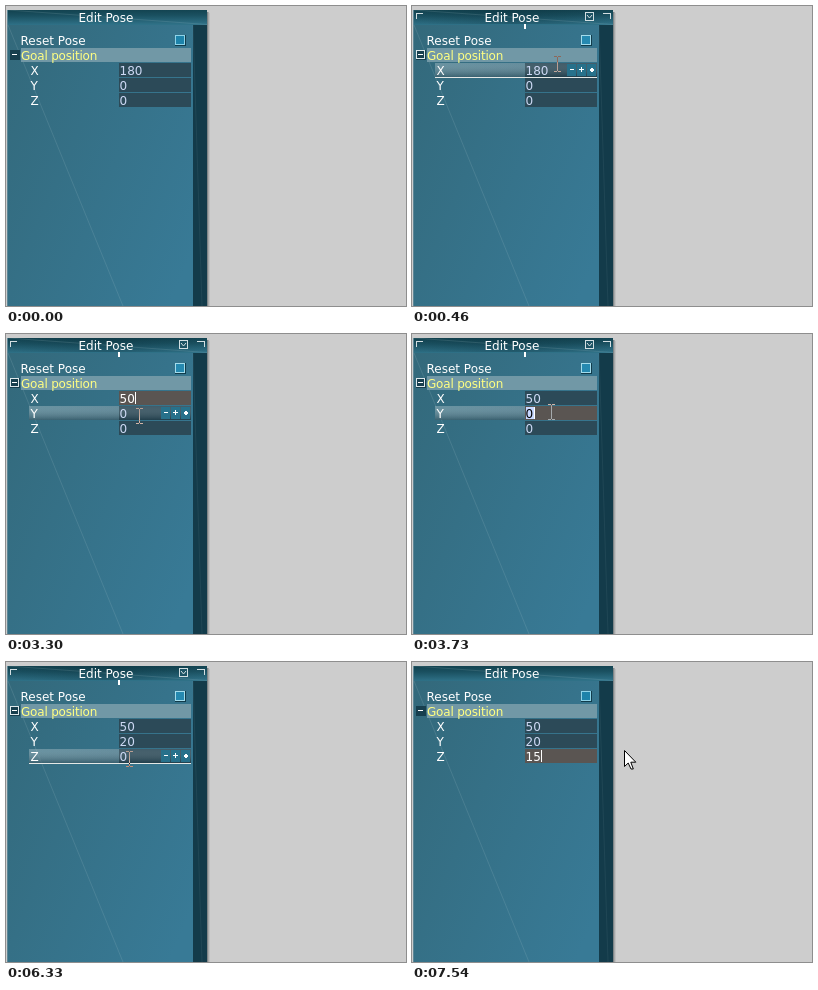
Recreate the animation shown at these times as an HTML page. Size 400x300 px, loop 8000 ms.

```html
<!DOCTYPE html>
<html lang="en">
<head>
<meta charset="utf-8">
<title>Edit Pose</title>
<style>
  html, body { margin: 0; width: 100%; height: 100%; overflow: hidden; background: #cdcdcd; }
  svg { display: block; width: 400px; height: 300px; }
  text { font: 12px "DejaVu Sans", Verdana, sans-serif; fill: #fff; white-space: pre; }
  .value { fill: #cdd9f4; }
  .edit .value { fill: #fff; }
  .selected .value { fill: #000; }
  .field { fill: #2c4a58; }
  .edit .field { fill: #5a5552; }
  .glow, .tools, .line, .caret, .pick, .active { visibility: hidden; }
  .hover .glow, .hover:not(.edit) .tools, .hover.idle .line,
  .edit .caret, .selected .pick, .over .active { visibility: visible; }
  #beam { mix-blend-mode: difference; }
</style>
</head>
<body>
<svg viewBox="0 0 400 300" shape-rendering="crispEdges">
  <defs>
    <linearGradient id="body" gradientUnits="userSpaceOnUse" x1="2" y1="19" x2="240" y2="119">
      <stop offset="0" stop-color="#33697b"/>
      <stop offset="1" stop-color="#387a96"/>
    </linearGradient>
    <linearGradient id="title" x2=".06" y2="1">
      <stop offset="0" stop-color="#12424f"/>
      <stop offset=".4" stop-color="#1a5060"/>
      <stop offset="1" stop-color="#2f7187"/>
    </linearGradient>
    <linearGradient id="titleOn">
      <stop offset="0" stop-color="#04212b" stop-opacity="0"/>
      <stop offset=".5" stop-color="#04212b" stop-opacity=".25"/>
      <stop offset="1" stop-color="#04212b" stop-opacity="0"/>
    </linearGradient>
    <linearGradient id="glow">
      <stop offset="0" stop-color="#a9c2ca" stop-opacity=".3"/>
      <stop offset="1" stop-color="#8a9ba3" stop-opacity=".35"/>
    </linearGradient>
    <linearGradient id="shade" x2="0" y2="1">
      <stop offset="0" stop-color="#fff" stop-opacity=".1"/>
      <stop offset="1" stop-color="#102c38" stop-opacity=".4"/>
    </linearGradient>
  </defs>

  <rect width="400" height="300" fill="#cdcdcd"/>
  <rect x="201" y="6" width="1" height="294" fill="#7f8587"/>
  <rect x="202" y="6" width="1" height="294" fill="#a6a8a9"/>
  <rect x="203" y="7" width="1" height="293" fill="#bebebe"/>

  <g id="panel">
    <rect x="2" y="4" width="199" height="296" fill="url(#body)"/>
    <rect x="1" y="4" width="1" height="296" fill="#5d8796"/>
    <rect x="187" y="19" width="14" height="281" fill="#133b4a"/>
    <rect x="2" y="4" width="199" height="15" fill="url(#title)"/>
    <rect class="active" x="2" y="4" width="199" height="14" fill="url(#titleOn)"/>
    <g shape-rendering="auto" fill="none" stroke="#b5cdd3" stroke-width=".7" opacity=".22">
      <path d="M2 19L117 300M2 4L201 18.5"/>
      <path d="M187 19L196 300" opacity=".5"/>
    </g>
    <g class="active" fill="none" stroke="#d3dfe2">
      <path d="M4.5 13V7.5H11M191 7.5H198.5V13"/>
      <rect x="173.5" y="6.5" width="8" height="8" fill="#1d5364"/>
      <path d="M175 9L177.5 12L180 9" shape-rendering="auto"/>
      <path d="M113 18V23" stroke="#fff" stroke-width="2"/>
    </g>
    <text x="72.5" y="16">Edit Pose</text>

    <text x="14.5" y="39">Reset Pose</text>
    <rect x="169" y="29" width="11" height="11" fill="#123c4b"/>
    <rect x="169.5" y="29.5" width="9" height="9" fill="#1d83aa" stroke="#8ed3e8"/>
    <rect class="active" x="169.5" y="29.5" width="9" height="9" fill="#2589b0" stroke="#a3dcec"/>

    <rect x="15" y="42" width="170" height="14" fill="#7198a6"/>
    <rect x="4" y="44" width="10" height="10" fill="#173f4e"/>
    <rect class="active" x="4.5" y="44.5" width="8" height="8" fill="none" stroke="#dfe9ec"/>
    <rect x="6" y="48" width="5" height="1" fill="#fff"/>
    <text x="15" y="54" style="fill:#ffff82;letter-spacing:-.2px">Goal position</text>
    <g id="rows"></g>
  </g>

  <path id="arrow" shape-rendering="auto" fill="#fff" stroke="#000"
        d="M.5 .5V16.5L4.2 13L7 19H9.3L6.8 12.2H11.8Z"/>
  <path id="beam" stroke="#fff" fill="none" d="M-3 -7.5H0M1 -7.5H4M-3 7.5H0M1 7.5H4M.5 -7V7"/>
</svg>

<script>
const $ = id => document.getElementById(id);
const LOOP = 8000, TOP = 57, ROW = 15, STEP = 52;

// Pointer moves: when they begin and end, and where they lead.
const entry = { x: 301, y: 290 };
const moves = [
  { from: 40, to: 460, x: 145, y: 58 },
  { from: 510, to: 600, x: 151, y: 60 },
  { from: 740, to: 740, x: 145, y: 65 },
  { from: 930, to: 930, x: 141, y: 68 },
  { from: 2830, to: 3120, x: 133, y: 86 },
  { from: 3270, to: 3270, x: 133, y: 82 },
  { from: 3630, to: 3730, x: 140, y: 77 },
  { from: 6100, to: 6330, x: 123, y: 97 },
  { from: 6480, to: 6700, x: 212, y: 88 }
];

// Editing opens at one time, typing begins at another, with a gap between keys.
const fields = [
  { name: 'X', start: '180', text: '50', open: 600, type: 1580, gap: 150, close: 3440 },
  { name: 'Y', start: '0', text: '20', open: 3440, type: 4570, gap: 90, close: 5350 },
  { name: 'Z', start: '0', text: '15', open: 6430, type: 7440, gap: 100, close: LOOP }
];

const easeOut = p => 1 - (1 - p) ** 2;

// The pointer is sampled in steps, each one holding until the next.
function pointerAt(t) {
  let { x, y } = entry;
  for (const m of moves) {
    if (t < m.from) break;
    const count = Math.round((m.to - m.from) / STEP) + 1;
    const done = Math.min(count, Math.floor((t - m.from) / STEP) + 1);
    const p = easeOut(done / count);
    x += (m.x - x) * p;
    y += (m.y - y) * p;
  }
  return { x: Math.round(x), y: Math.round(y) };
}

const tool = (x, d) => `<rect x="${x}" y="1" width="9" height="12" fill="#27718b"/>
  <path transform="translate(${x} 0)" d="${d}" fill="#fff"/>`;

$('rows').innerHTML = fields.map(({ name }, i) => `
  <g transform="translate(0 ${TOP + i * ROW})">
    <g class="glow">
      <rect x="23" width="90" height="14" fill="url(#glow)"/>
      <rect x="23" width="90" height="14" fill="url(#shade)"/>
    </g>
    <rect class="field" x="113" width="72" height="14"/>
    <g class="tools">
      <rect x="113" width="72" height="14" fill="url(#shade)"/>
      ${tool(155, 'M3 6h4v1h-4z')}
      ${tool(165, 'M2 6h5v1h-5zM4 4h1v5h-1z')}
      ${tool(175, 'M4 5h2v1h1v2h-1v1h-2v-1h-1v-2h1z')}
    </g>
    <rect class="line" x="23" y="14" width="162" height="1" fill="#e4e8e6"/>
    <rect class="pick" x="114" y="1" height="12" fill="#c7d7ff"/>
    <text x="24.5" y="12">${name}</text>
    <text class="value" x="113.5" y="12"></text>
    <rect class="caret" y="1" width="1" height="12" fill="#fff"/>
  </g>`).join('');

const rows = [...$('rows').children];

function draw(t) {
  const { x, y } = pointerAt(t);
  const hovered = x >= 15 && x < 185 ? Math.floor((y - TOP) / ROW) : -1;
  const editing = fields.findIndex(f => t >= f.open && t < f.close);
  $('panel').classList.toggle('over', x < 201 && y >= 4);

  rows.forEach((row, i) => {
    const f = fields[i];
    const typed = Math.max(0, Math.floor((t - f.type) / f.gap) + 1);
    const value = f.text.slice(0, typed) || f.start;
    const edit = i === editing;
    row.classList.toggle('hover', i === hovered);
    row.classList.toggle('idle', editing < 0);
    row.classList.toggle('edit', edit);
    row.classList.toggle('selected', edit && !typed);
    row.querySelector('.value').textContent = value;
    const width = Math.round(value.length * 7.63);
    row.querySelector('.pick').setAttribute('width', width);
    row.querySelector('.caret').setAttribute('x', 114 + width);
  });

  const inField = hovered >= 0 && hovered < fields.length && x >= 113;
  const beam = inField && (x < 155 || hovered === editing);
  const arrow = t >= moves[0].from && !beam;
  for (const [id, shown] of Object.entries({ beam, arrow })) {
    $(id).setAttribute('transform', `translate(${x} ${y})`);
    $(id).style.display = shown ? '' : 'none';
  }
}

const began = performance.now();
function tick() {
  draw((performance.now() - began) % LOOP);
  requestAnimationFrame(tick);
}
tick();
</script>
</body>
</html>
```
